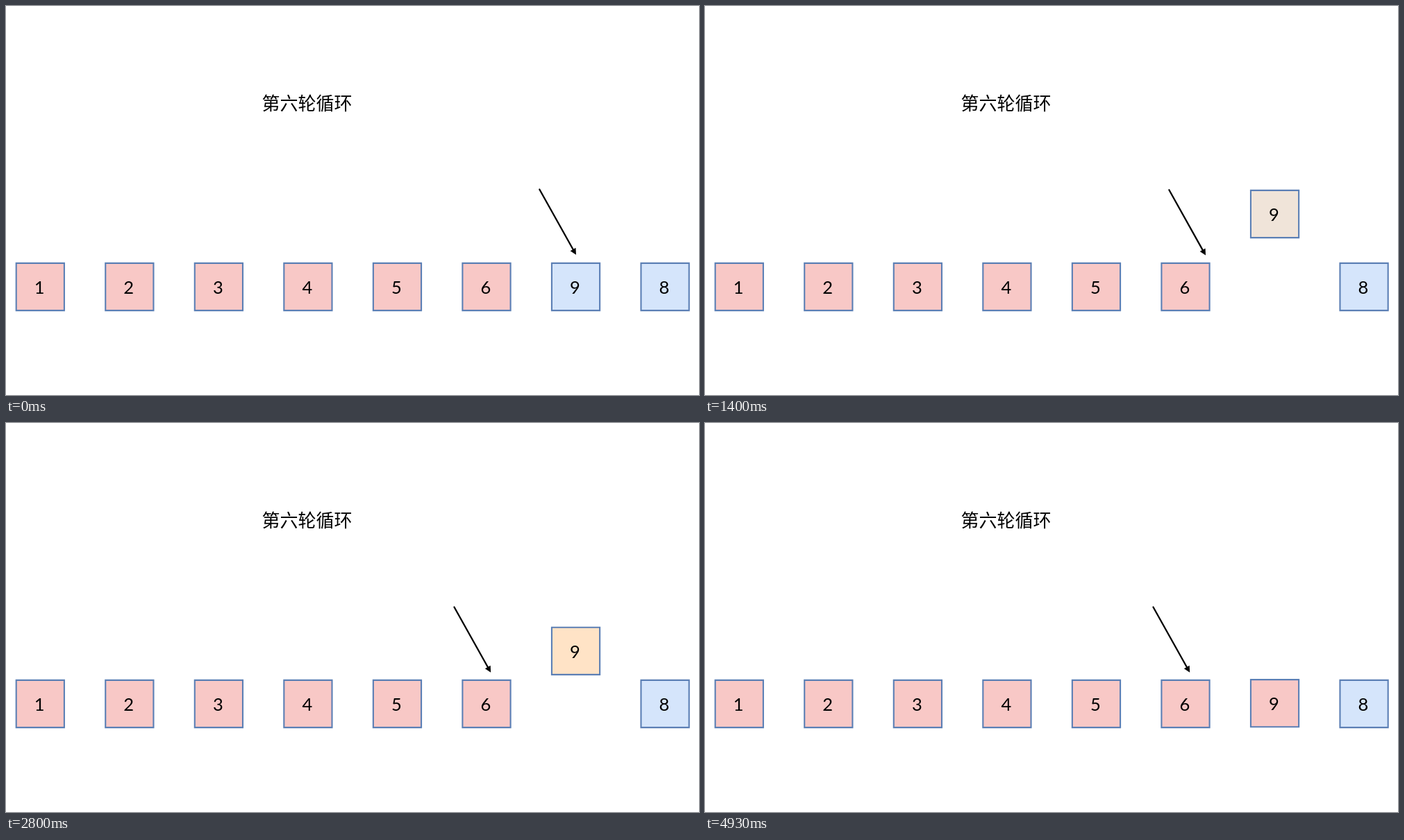
Recreate the animation shown at these times as an HTML page with a canvas. Size 998 by 561 pixels, loop 6 s.

```html
<!DOCTYPE html>
<html lang="zh-CN">
<head>
<meta charset="utf-8">
<title>第六轮循环</title>
<style>
  html, body { margin: 0; width: 100%; height: 100%; overflow: hidden; background: #fff; }
  canvas { display: block; width: 998px; height: 561px; }
</style>
</head>
<body>
<canvas id="stage" width="998" height="561"></canvas>
<script>
const ctx = document.getElementById('stage').getContext('2d');
const LOOP = 6000, FPS = 15;
const PINK = [248, 200, 198], BLUE = [213, 229, 251], ORANGE = [255, 227, 198];

const mix = (a, b, k) => a + (b - a) * k;
const blend = (a, b, k) => a.map((v, i) => mix(v, b[i], k));
const progress = (t, from, to) => Math.min(1, Math.max(0, (t - from) / (to - from)));
const smooth = u => u * u * u * (u * (6 * u - 15) + 10);

function drawBox(slot, digit, fill, lift = 0) {
  const cx = 49.3 + slot * 128.54, cy = 405 - lift;
  ctx.fillStyle = `rgb(${fill.map(Math.round)})`;
  ctx.strokeStyle = '#5b7fb5';
  ctx.lineWidth = 2.1;
  ctx.beginPath();
  ctx.rect(cx - 34.6, cy - 34.1, 69.2, 68.2);
  ctx.fill();
  ctx.stroke();
  ctx.fillStyle = '#000';
  ctx.font = '25.5px Lato, sans-serif';
  ctx.fillText(digit, cx - 1.1, cy + 10);
}

function drawArrow(x, y) {
  ctx.save();
  ctx.translate(x, y);
  ctx.rotate(Math.atan2(94, 52.5));
  ctx.strokeStyle = ctx.fillStyle = '#000';
  ctx.lineWidth = 2.3;
  ctx.lineCap = 'round';
  ctx.beginPath();
  ctx.moveTo(0, 0);
  ctx.lineTo(100, 0);
  ctx.stroke();
  ctx.beginPath();
  ctx.moveTo(108, 0);
  ctx.lineTo(99, -4.5);
  ctx.lineTo(99, 4.5);
  ctx.fill();
  ctx.restore();
}

function draw(t) {
  const up = smooth(progress(t, 430, 1850));
  const down = smooth(progress(t, 1940, 3840));
  const warm = blend(BLUE, ORANGE, progress(t, 430, 1930));
  const fill = blend(warm, PINK, progress(t, 3730, 4330));

  ctx.fillStyle = '#fff';
  ctx.fillRect(0, 0, 998, 561);
  ctx.textAlign = 'center';
  ctx.fillStyle = '#000';
  ctx.font = '500 26px "Noto Sans CJK SC", "Noto Sans CJK", sans-serif';
  ctx.fillText('第六轮循环', 433.5, 149.5);

  for (let i = 0; i < 6; i++) drawBox(i, i + 1, PINK);
  drawBox(7, 8, BLUE);
  drawBox(6, 9, fill, 129 * up - 128.2 * down);
  drawArrow(mix(768.3, 645.5, up), mix(264.5, 265.5, up));
}

const start = performance.now();
function tick() {
  const t = (performance.now() - start) % LOOP;
  draw(Math.floor(t * FPS / 1000 + 0.05) * 1000 / FPS);
  requestAnimationFrame(tick);
}
tick();
</script>
</body>
</html>
```
